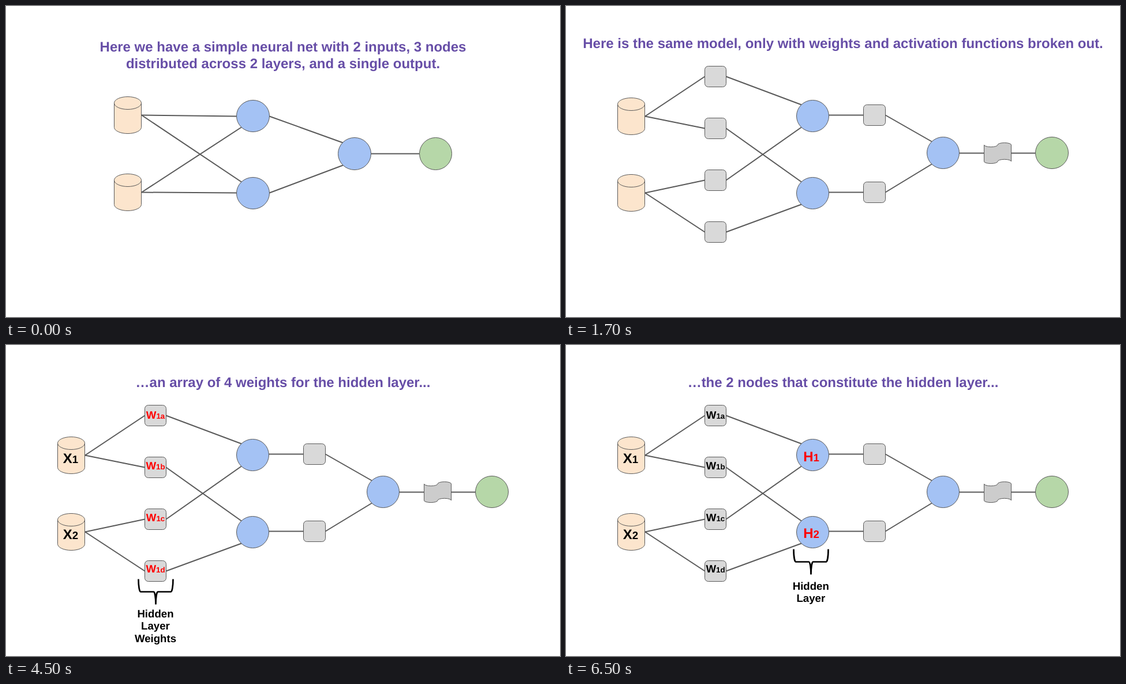
Write an HTML page that moves like this. It is 960 px wide and 540 px high and loops after 8000 ms.

```html
<!DOCTYPE html>
<html lang="en">
<head>
<meta charset="utf-8">
<title>Neural net diagram</title>
<style>
  html, body { margin: 0; width: 100%; height: 100%; overflow: hidden; background: #fff; }
  svg { display: block; width: 100%; height: 100%; }
  text {
    font-family: "Liberation Sans", Arial, sans-serif;
    font-weight: bold;
    text-anchor: middle;
    text-rendering: geometricPrecision;
  }
</style>
</head>
<body>
<svg id="stage" viewBox="0 0 960 540"></svg>
<script>
const LOOP = 8000;
const STARTS = [0, 500, 2500, 4500, 6500];
const INK = '#595959', BLUE = '#a4c2f4', GREEN = '#b6d7a8', PEACH = '#fce5cd';
const LARGE = 24, MEDIUM = 18.667, SMALL = 13.333;

const outlined = (fill, d) =>
  `<path d="${d}" fill="${fill}" stroke="${INK}" stroke-linejoin="round"/>`;

const line = (x1, y1, x2, y2) =>
  `<path d="M${x1} ${y1}L${x2} ${y2}" stroke="${INK}" stroke-width="2"/>`;

const node = (x, y, fill = BLUE, rx = 28, ry = 27.5) =>
  `<ellipse cx="${x}" cy="${y}" rx="${rx}" ry="${ry}" fill="${fill}" stroke="${INK}"/>`;

const box = (x, y, w = 37) =>
  `<rect x="${x}" y="${y}" width="${w}" height="36" rx="6" fill="#d9d9d9" stroke="${INK}"/>`;

function cylinder(x, y) {
  const w = 47, h = 64, r = 11;
  return outlined(PEACH, `M${x} ${y + r}a${w / 2} ${r} 0 0 1 ${w} 0v${h - 2 * r}a${w / 2} ${r} 0 0 1 ${-w} 0z`) +
    outlined('none', `M${x} ${y + r}a${w / 2} ${r} 0 0 0 ${w} 0`);
}

function tape(x, y, w, h) {
  const r = h / 10, half = w / 2;
  const arc = (sweep, dx) => `a${w / 4} ${r} 0 0 ${sweep} ${dx} 0`;
  return outlined('#ccc', `M${x} ${y + r}${arc(0, half)}${arc(1, half)}v${h - 2 * r}${arc(0, -half)}${arc(1, -half)}z`);
}

function brace(x, y) {
  const r = 3.7, run = 30 - 2 * r;
  return `<path d="M${x} ${y}a${r} 22 0 0 0 ${r} 22h${run}a${r} 22 0 0 1 ${r} 22` +
    `a${r} 22 0 0 1 ${r} -22h${run}a${r} 22 0 0 0 ${r} -22" fill="none" stroke="#000" stroke-width="2.67"/>`;
}

const text = (x, y, size, fill, content) =>
  `<text x="${x}" y="${y}" font-size="${size}" fill="${fill}">${content}</text>`;

const title = (content, y = 73) => text(480, y, LARGE, '#674ea7', content);

const caption = (x, y, lines) =>
  lines.map((s, i) => text(x, y + i * 21.9, MEDIUM, '#000', s)).join('');

const symbol = (x, y, letter, sub, fill, size = LARGE, subSize = MEDIUM) =>
  text(x, y, size, fill, `${letter}<tspan font-size="${subSize}">${sub}</tspan>`);

function simpleNet() {
  return line(235, 189.5, 400, 191.5) + line(235, 189.5, 408, 305.5) +
    line(235, 323.5, 408, 210.5) + line(235, 323.5, 400, 324.5) +
    line(456.5, 191.5, 584, 237.5) + line(456.5, 324.5, 584, 276.5) +
    line(632.5, 256.5, 716.5, 256.5) +
    cylinder(187.5, 157.5) + cylinder(187.5, 291.5) +
    node(428, 191, BLUE, 28.5) + node(428, 325, BLUE, 28.5) +
    node(604, 256.5, BLUE, 28.5, 28) + node(744.5, 256.5, GREEN, 28, 28);
}

function fullNet() {
  const targets = [171.5, 305.5, 210.5, 344.5];
  let lines = '', shapes = '';
  targets.forEach((target, i) => {
    const y = 122.5 + 90 * i;
    lines += line(137, i < 2 ? 191.5 : 324.5, 240.5, y) + line(277.5, y, 408, target);
    shapes += box(240.5, y - 18);
  });
  [0, 1].forEach(i => {
    const y = 189.5 + 134 * i;
    lines += line(455.5, y, 515.5, y) + line(553.5, y, 634, i ? 274.5 : 235.5);
    shapes += cylinder(89.5, 159.5 + 133 * i) + node(427.5, 191 + 134 * i) + box(515.5, y - 18, 38);
  });
  lines += line(681.5, 255.5, 724.5, 255.5) + line(771.5, 255.5, 813.5, 255.5);
  return lines + shapes + node(653.5, 255) + tape(724.5, 237.5, 47, 36) + node(842, 255, GREEN, 28.5);
}

const inputs = fill =>
  symbol(112, 205, 'X', 1, fill) + symbol(112, 337, 'X', 2, fill);

const weights = fill => [128, 216, 305.5, 395]
  .map((y, i) => symbol(259, y, 'W', '1' + 'abcd'[i], fill, MEDIUM, SMALL)).join('');

const hidden = fill =>
  symbol(425, 201.5, 'H', 1, fill) + symbol(425, 335, 'H', 2, fill);

const net = fullNet();
const scenes = [
  simpleNet() + title('Here we have a simple neural net with 2 inputs, 3 nodes', 79) +
    title('distributed across 2 layers, and a single output.', 108),
  net + title('Here is the same model, only with weights and activation functions broken out.'),
  net + title('Specifically, we have our 2 inputs…') + inputs('red') +
    brace(83.5, 365) + caption(113.3, 430, ['Model', 'Inputs', '(Features)']),
  net + title('…an array of 4 weights for the hidden layer...') + inputs('#000') + weights('red') +
    brace(229.5, 406.5) + caption(259, 472.5, ['Hidden', 'Layer', 'Weights']),
  net + title('…the 2 nodes that constitute the hidden layer...') + inputs('#000') + weights('#000') +
    hidden('red') + brace(394.5, 354.5) + caption(424.3, 424.5, ['Hidden', 'Layer'])
];

const stage = document.getElementById('stage');
stage.innerHTML = scenes.map(s => `<g display="none">${s}</g>`).join('');
const groups = [...stage.children];

function draw(time) {
  const t = time % LOOP;
  const current = STARTS.findLastIndex(start => t >= start);
  groups.forEach((g, i) => g.setAttribute('display', i === current ? 'inline' : 'none'));
}

const begin = performance.now();
function tick() {
  draw(performance.now() - begin);
  requestAnimationFrame(tick);
}
tick();
</script>
</body>
</html>
```
